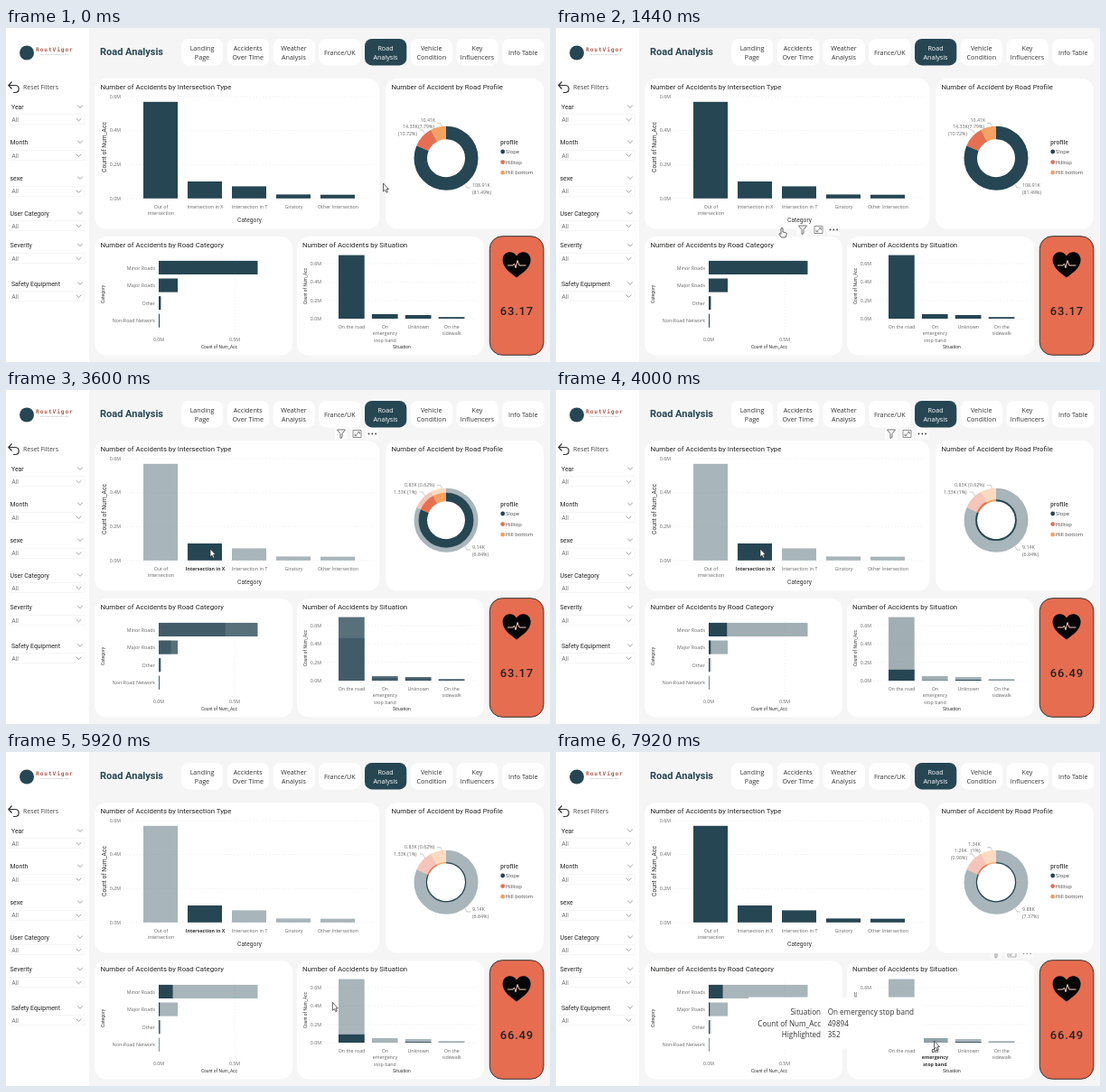
Recreate the animation shown at these times as an HTML page. Size 602 by 370 pixels, loop 8 s.

```html
<!DOCTYPE html>
<html lang="en">
<head>
<meta charset="utf-8">
<title>Road Analysis</title>
<style>
  html, body { margin: 0; width: 100%; height: 100%; overflow: hidden; background: #f5f5f5; }
  svg { display: block; width: 100vw; height: 100vh; }
  text { font-family: "Open Sans", "Noto Sans", sans-serif; white-space: pre; }
  .din { font-family: Roboto, "Liberation Sans", sans-serif; }
  .wide { letter-spacing: .8px; }
  .mono { font-family: "DejaVu Sans Mono", monospace; letter-spacing: .9px; }
</style>
</head>
<body>
<svg viewBox="0 0 602 370" preserveAspectRatio="none">
  <clipPath id="low"><rect x="470" y="223" width="62" height="7"/></clipPath>
  <g id="base"></g>
  <g id="live"></g>
</svg>
<script>
const LOOP = 8000;
const DARK = '#264653', CORAL = '#e76f51', SAND = '#f4a261', GREY = '#666';
const clamp = v => Math.max(0, Math.min(1, v));
const within = (t, a, b) => t >= a && t < b;

const rect = (x, y, w, h, fill, r = 0, extra = '') =>
  `<rect x="${x}" y="${y}" width="${w}" height="${h}" rx="${r}" fill="${fill}" ${extra}/>`;
const line = (d, stroke, w = .6, extra = '') =>
  `<path d="${d}" fill="none" stroke="${stroke}" stroke-width="${w}" ${extra}/>`;
const dots = d => line(d, '#dedede', .6, 'stroke-dasharray="1 2.5"');

// y is the vertical middle of the lettering
function text(x, y, s, size, o = {}) {
  const { at = 'start', fill = GREY, weight = 400, cls = '', turn = 0 } = o;
  const spin = turn ? `transform="rotate(-90 ${x} ${y})"` : '';
  return `<text x="${x}" y="${y + size * .35}" font-size="${size}" text-anchor="${at}" ` +
    `fill="${fill}" font-weight="${weight}" class="${cls}" ${spin}>${s}</text>`;
}
const mid = (x, y, s, size, o) => text(x, y, s, size, { at: 'middle', ...o });
const end = (x, y, s, size, o) => text(x, y, s, size, { at: 'end', ...o });
const rows = (x, y, s, size, step, o) =>
  s.split('|').map((part, i) => mid(x, y + i * step, part, size, o)).join('');
const din = (fill = '#333', weight = 400) => ({ cls: 'din', fill, weight });

function sidebar() {
  const filters = [['Year', 87.7, 101.8], ['Month', 126.8, 141.3], ['sexe', 166.7, 181.2],
    ['User Category', 205.6, 219.5], ['Severity', 241, 255.7], ['Safety Equipment', 283.5, 297.3]];
  const chevron = (x, y) => line(`M${x - 2.8} ${y - 1.3}l2.8 2.7 2.8-2.7`, '#777', .7);
  return rect(0, 0, 92, 370, '#fff') +
    `<circle cx="23" cy="27.5" r="8" fill="${DARK}"/>` +
    text(33, 24, 'RoutVigor', 6.2, { cls: 'mono', fill: '#b5594b', weight: 700 }) +
    text(37, 29, 'Safer travel through better data', 2.2, { fill: '#999' }) +
    line('M6.5 59.5L2.8 63.5L6.5 67.5M3 63.5H10C15.5 63.5 15.5 71.5 10 71.5H8', '#333', 1.2) +
    text(19, 65.8, 'Reset Filters', 6.9, { fill: '#444' }) +
    filters.map(([name, y, v]) =>
      text(name === 'Year' || name[1] === 'a' ? 6 : 4.5, y, name, 6.9, din('#222')) +
      chevron(82, y - .7) +
      rect(4, v - 6, 83, 11, 'none', 0, 'stroke="#eee" stroke-width=".6"') +
      text(6.5, v, 'All', 6.5) + chevron(80.5, v - .3)).join('');
}

function nav() {
  const tabs = ['Landing|Page', 'Accidents|Over Time', 'Weather|Analysis', 'France/UK',
    'Road|Analysis', 'Vehicle|Condition', 'Key|Influencers', 'Info Table'];
  return text(104, 26, 'Road Analysis', 11, din(DARK, 700)) + tabs.map((s, i) => {
    const x = 194 + i * 50.75, on = i === 4, two = s.includes('|');
    return rect(x, 12, 46.3, 29.4, on ? DARK : '#fff', 8) +
      rows(x + 23, two ? 22 : 27, s, 7.2, 10, { fill: on ? '#fff' : '#333' });
  }).join('');
}

function frames() {
  const panel = (x, y, w, h, title, tx) =>
    rect(x, y, w, h, '#fff', 13) + text(tx, y + 9.3, title, 7.8, din('#252423'));
  return panel(98, 56, 315.5, 166.5, 'Number of Accidents by Intersection Type', 104.5) +
    panel(420, 56, 175, 166.5, 'Number of Accident by Road Profile', 426.5) +
    panel(98, 231, 219, 131.5, 'Number of Accidents by Road Category', 104.5) +
    panel(322, 231, 207, 131.5, 'Number of Accidents by Situation', 328);
}

function axes() {
  let s = '';
  ['0.6M', '0.4M', '0.2M', '0.0M'].forEach((v, i) => {
    const y = 76 + i * 37.6, y2 = 261 + i * 20.4;
    s += end(127, y, v, 5.3) + dots(`M130 ${y}H407`) + end(349, y2, v, 5.3) + dots(`M352 ${y2}H522`);
  });
  [['0.0M', 169], ['0.5M', 253]].forEach(([v, x]) => {
    s += mid(x, 345, v, 5.3) + dots(`M${x} 253V339`);
  });
  ['Minor Roads', 'Major Roads', 'Other', 'Non-Road Network'].forEach((v, i) => {
    s += end(165, 265.7 + i * 19.5, v, 5.3);
  });
  const up = { turn: 1 };
  return s + mid(109, 132, 'Count of Num_Acc', 6.7, { ...din(), ...up }) +
    mid(269.5, 213, 'Category', 6.7, din()) +
    mid(107.5, 295, 'Category', 5, { ...din(), ...up }) +
    mid(236, 353, 'Count of Num_Acc', 4.8, din()) +
    mid(331.5, 286, 'Count of Num_Acc', 4.8, { ...din(), ...up }) +
    mid(438, 353, 'Situation', 5, din());
}

function legend() {
  return text(547, 127, 'profile', 6.1, { weight: 700, fill: '#555' }) +
    [['Slope', DARK], ['Hilltop', CORAL], ['Hill bottom', SAND]].map(([s, c], i) =>
      `<circle cx="549.7" cy="${137 + i * 11.6}" r="2.4" fill="${c}"/>` +
      text(553, 137 + i * 11.6, s, 5.8, { fill: '#444' })).join('');
}

function card() {
  return rect(535.3, 230.7, 59.6, 131.6, '#e66d50', 14, 'stroke="#333" stroke-width="1"') +
    '<path d="M565 276.6C558 271 549.6 265.5 549.6 257C549.6 247 561 245.5 565 252.5C569 245.5 580.6 247 580.6 257C580.6 265.5 572 271 565 276.6Z" fill="#050505"/>' +
    line('M555 263H561L562.5 261L564 265.8L566 257.5L568 263H575.5', '#f5cdc1', 1);
}

// Bars: the pale whole with its highlighted share laid over it
function shareBar(x, y, w, h, share, p, across, pale) {
  const k = 1 - p * (1 - share);
  const hw = across ? w * k : w, hh = across ? h : h * k;
  return rect(x, y, w, h, DARK, 0, `opacity="${pale}"`) +
    (p ? rect(x, y + h - hh, hw, hh, DARK, 0, `opacity="${Math.min(1, p * 1.2)}"`) : '');
}

function intersections(t) {
  const picked = within(t, 2700, 7560);
  const names = ['Out of|intersection', 'Intersection in X', 'Intersection in T', 'Giratory', 'Other Intersection'];
  return [107, 18.8, 13.4, 4.4, 4.1].map((h, i) =>
    rect(152 + i * 49, 188.8 - h, 38, h, DARK, 0, `opacity="${picked && i !== 1 ? .4 : 1}"`) +
    rows(171.5 + i * 49, 198, names[i], 5.3, 7.3,
      picked && i === 1 ? { weight: 700, fill: '#333' } : {})).join('');
}

function categories(p) {
  const share = [.142, .06, .4, .3];
  return [109.5, 21, 2.4, 1].map((w, i) =>
    shareBar(169, 257.9 + i * 19.6, w, 15.1, share[i], p, true, 1 - .6 * p)).join('');
}

function situations(t, p) {
  const names = ['On the road', 'On|emergency|stop band', 'Unknown', 'On the|sidewalk'];
  const share = [.13, .007, .2, .05];
  return [70.4, 5, 4, 1.8].map((h, i) => {
    const picked = i === 1 && t >= 7560;
    return shareBar(368 + i * 36.9, 322 - h, 28.7, h, share[i], p, false, picked ? .5 : 1 - .6 * p) +
      rows(382.5 + i * 36.9, 331, names[i], 5.3, 7.4, picked ? { weight: 700, fill: '#333' } : {});
  }).join('');
}

function ring(r0, r1, from, len, color, alpha) {
  return `<circle cx="487" cy="144.2" r="${(r0 + r1) / 2}" fill="none" stroke="${color}" ` +
    `stroke-width="${r1 - r0}" pathLength="100" stroke-dasharray="${len} 100" ` +
    `stroke-dashoffset="${-from}" transform="rotate(-90 487 144.2)" opacity="${alpha}"/>`;
}

function donut(t, p) {
  const parts = [[0, 81.49, DARK, .084], [81.49, 10.72, CORAL, .093], [92.21, 7.79, SAND, .08]];
  const label = (x, y, s) => text(x, y, s, 5.3);
  let s = parts.map(([from, len, c, share]) =>
    (p ? ring(21, 35.5, from, len, c, .4) : '') +
    ring(21, 21 + 14.5 * (1 - p * (1 - share)), from, len, c, 1)).join('');
  s += line('M477 105.5H481L482.5 109M457.5 113H461L464 118M508 173L510 177H514', '#aaa', .6);
  if (t < 3520) {
    s += label(458.5, 102, '10.41K') + label(456, 109, '(7.79%)') + label(439, 109, '14.33K') +
      label(434, 117, '(10.72%)') + label(516, 174, '108.91K') + label(516, 182, '(81.49%)');
  } else if (t < 7560) {
    s += label(441, 105, '0.83K (0.62%)') + label(429, 113, '1.33K (1%)') +
      label(516, 174, '9.14K') + label(516, 182, '(6.84%)');
  } else {
    s += label(456, 102, '1.34K') + label(459, 109, '(1%)') + label(441, 109, '1.29K') +
      label(437, 117, '(0.96%)') + label(516, 174, '9.88K') + label(516, 182, '(7.37%)');
  }
  return s;
}

function toolbar(x, y) {
  return [0, 17.4, 34.3].map(d => rect(x + d - 7, y - 6.5, 14, 13, '#fbfbfb')).join('') +
    line(`M${x - 4.5} ${y - 4.5}h9l-3.5 4.5v4l-2 1v-5z`, '#555', .8) +
    line(`M${x + 13} ${y - 4}h9v8h-9zM${x + 18} ${y - 2}h2.3v2.3M${x + 20} ${y - 2}l-4.5 4M${x + 15} ${y}v2.2h2.3`, '#666', .7) +
    [30.5, 34.3, 38.1].map(d => `<circle cx="${x + d}" cy="${y}" r=".9" fill="#444"/>`).join('');
}

function toolbars(t) {
  if (within(t, 1000, 1640)) return toolbar(273, 223.5);
  if (within(t, 1640, 5600)) return toolbar(371, 48.5);
  if (t >= 6240) return `<g clip-path="url(#low)" opacity=".7">${toolbar(487, 223)}</g>`;
  return '';
}

function tooltip(box, x, y, pairs) {
  const o = { fill: '#333' };
  return rect(...box, '#fff') + pairs.map(([k, v], i) =>
    end(x, y + i * 12.5, k, 8.1, o) + text(x + 7.7, y + i * 12.5, v, 8.1, o)).join('');
}

function tooltips(t) {
  if (within(t, 2080, 3540)) return tooltip([243, 149, 158, 36], 323, 156.9,
    [['Category', 'Intersection in X'], ['Count of Num_Acc', '98518']]);
  if (t >= 6700) return tooltip([213, 271.6, 194, 57], 293, 288.3,
    [['Situation', 'On emergency stop band'], ['Count of Num_Acc', '49894'], ['Highlighted', '352']]);
  return '';
}

const PATH = [[0, 417.5, 172], [320, 417.5, 172], [1120, 249, 221], [1440, 249, 221], [2000, 226, 176],
  [4560, 226, 176], [5040, 241.5, 188], [5400, 241.5, 188], [6240, 418.5, 320], [LOOP, 418.5, 320]];

function cursor(t) {
  const i = PATH.findIndex(k => k[0] > t);
  const [t0, x0, y0] = PATH[i - 1], [t1, x1, y1] = PATH[i];
  const u = (t - t0) / (t1 - t0), e = u * u * (3 - 2 * u);
  const d = within(t, 1060, 1560)
    ? 'M0 1Q1-.6 2 1V5L5.5 5.8Q6.5 6.2 6 8L5 11H.5L-2 7.5Q-2.2 6 0 7.3Z'
    : 'M0 0V9L2 7.2L3.5 10.3L4.9 9.6L3.5 6.6H6Z';
  return `<path d="${d}" transform="translate(${x0 + (x1 - x0) * e} ${y0 + (y1 - y0) * e})" ` +
    'fill="#fff" stroke="#222" stroke-width=".7" stroke-linejoin="round"/>';
}

const base = document.getElementById('base'), live = document.getElementById('live');
base.innerHTML = sidebar() + nav() + frames() + axes() + legend() + card();

function draw(now) {
  const t = now % LOOP;
  const p = 1 - (1 - clamp((t - 3450) / 710)) ** 2;
  live.innerHTML = intersections(t) + donut(t, p) + categories(p) + situations(t, p) +
    mid(565.4, 313.7, t < 3700 ? '63.17' : '66.49', 13, { cls: 'din wide', fill: '#222', weight: 500 }) +
    toolbars(t) + tooltips(t) + cursor(t);
  requestAnimationFrame(draw);
}
draw(0);
</script>
</body>
</html>
```
